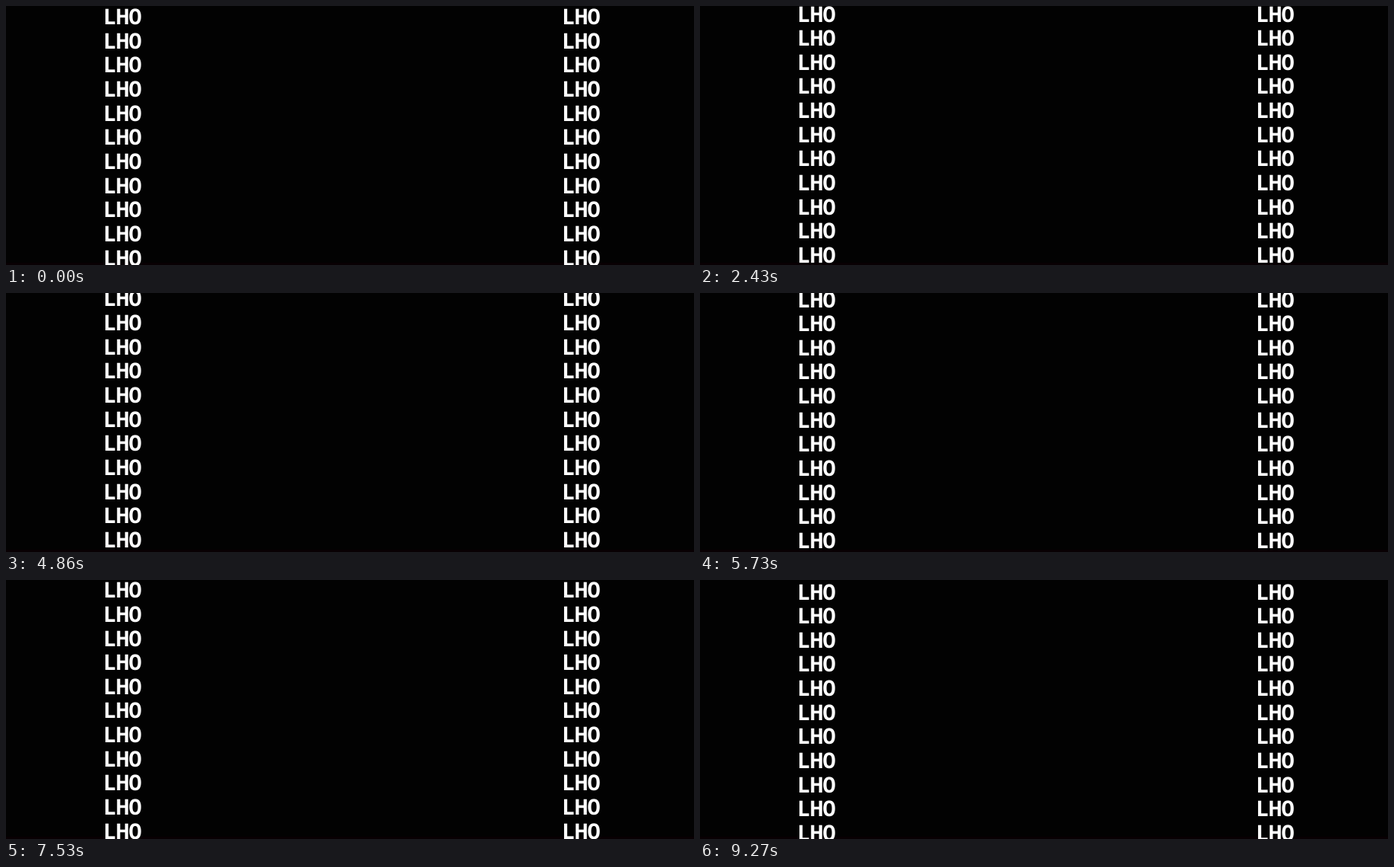
Recreate the animation shown at these times as an HTML page. Size 900 by 340 pixels, loop 9.3 s.

```html
<!DOCTYPE html>
<html lang="en">
<head>
<meta charset="utf-8">
<title>Scrolling columns</title>
<style>
  html, body { margin: 0; width: 100%; height: 100%; overflow: hidden; background: #000; }
  svg { display: block; width: 900px; height: 340px; }
  text {
    font: 700 28.4px "Noto Sans Mono", "DejaVu Sans Mono", monospace;
    letter-spacing: -0.6px;
    fill: #fff;
    text-rendering: geometricPrecision;
  }
</style>
</head>
<body>
<svg viewBox="0 0 900 340">
  <rect width="900" height="340" fill="#020202"/>
  <rect y="337" width="900" height="3" fill="#080003"/>
  <g id="words"></g>
</svg>
<script>
  const LOOP = 9300, STEP = 30;
  const PITCH = 31.65, BASELINE = 24, ROWS = 13;
  const COLUMNS = [127.6, 727.6];
  const WORD = "LHO";

  // [time in ms, distance travelled downwards in px]
  const TRAVEL = [
    [0, 0], [1230, 46.4], [2430, 91.5], [3990, 150.6],
    [5730, 216.1], [7530, 284.1], [9270, 349.7], [9300, 350.8]
  ];

  const words = document.getElementById("words");
  for (const x of COLUMNS) {
    for (let row = -1; row < ROWS - 1; row++) {
      const text = document.createElementNS("http://www.w3.org/2000/svg", "text");
      text.setAttribute("x", x);
      text.setAttribute("y", BASELINE + row * PITCH);
      text.textContent = WORD;
      words.append(text);
    }
  }

  function travelAt(time) {
    const next = TRAVEL.findIndex(([t]) => t > time);
    const [t0, d0] = TRAVEL[next - 1];
    const [t1, d1] = TRAVEL[next];
    return d0 + (d1 - d0) * (time - t0) / (t1 - t0);
  }

  const start = performance.now();

  function draw() {
    const elapsed = Math.max(0, performance.now() - start) % LOOP;
    const time = Math.floor(elapsed / STEP) * STEP;
    const shift = travelAt(time) % PITCH;
    words.setAttribute("transform", `translate(0 ${shift.toFixed(2)})`);
    requestAnimationFrame(draw);
  }
  draw();
</script>
</body>
</html>
```
